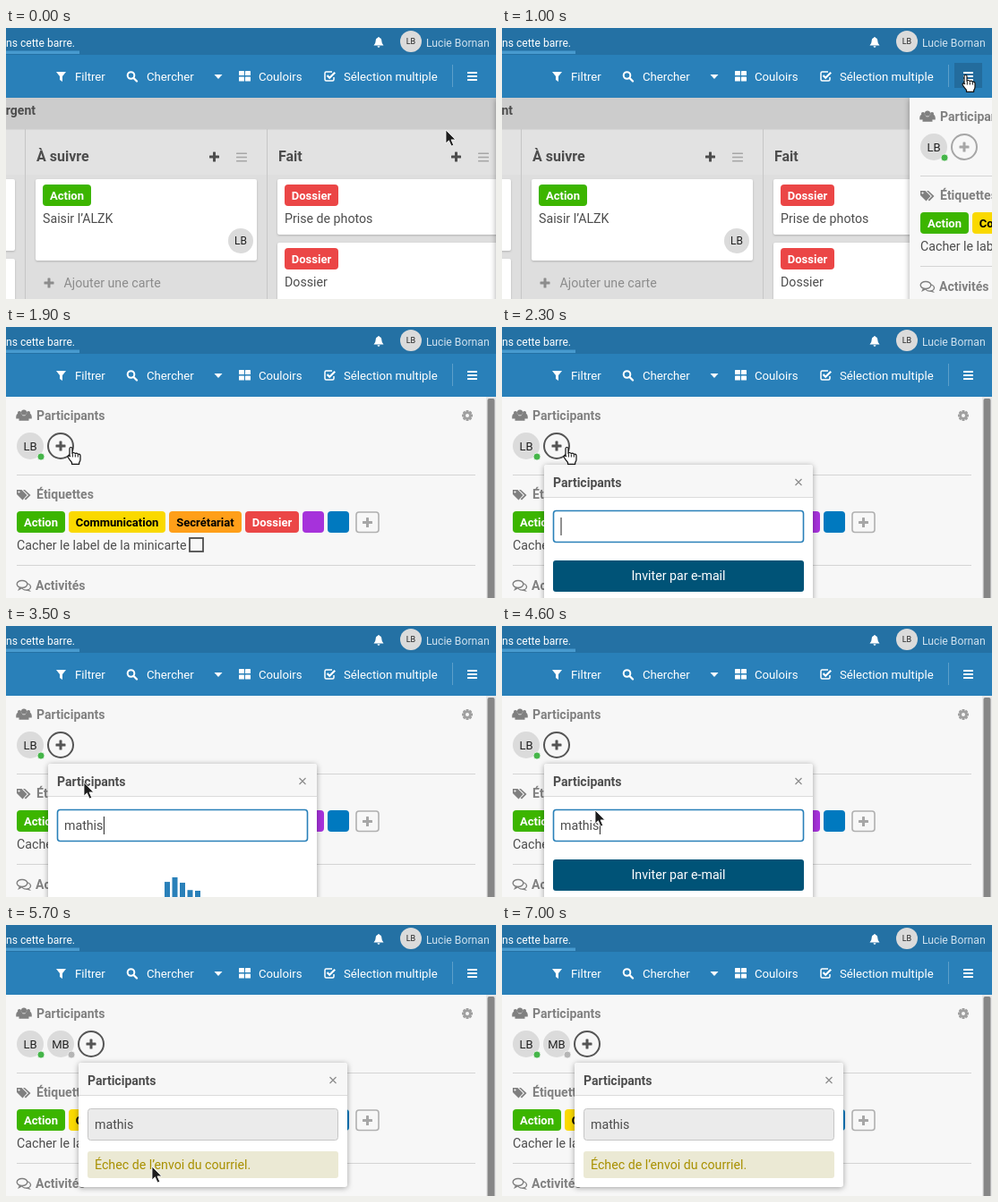
An HTML page that plays this animation: 547 by 303 pixels, repeating every 7.1 s.

```html
<!DOCTYPE html>
<html lang="fr">
<head>
<meta charset="utf-8">
<title>Ajouter un participant</title>
<style>
  html, body { margin: 0; width: 100%; height: 100%; overflow: hidden; }
  svg { display: block; width: 547px; height: 303px; font-family: Roboto, sans-serif; }
  text { white-space: pre; }
  .shadow { filter: drop-shadow(0 1px 3px rgba(0, 0, 0, .35)); }
  .card { filter: drop-shadow(0 1px 1px rgba(0, 0, 0, .2)); }
</style>
</head>
<body>
<svg id="stage" viewBox="0 0 547 303"></svg>
<script>
const LOOP = 7100, STEP = 100;
const GREEN = '#3cb500', RED = '#eb4646', BLUE = '#2980b9', INK = '#4d4d4d', MUTED = '#808080';
const QUERY = 'mathis';

// Drawing helpers
const text = (s, x, y, fill = INK, size = 14.2, extra = '') =>
  `<text x="${x}" y="${y}" fill="${fill}" font-size="${size}" ${extra}>${s}</text>`;
const bold = (s, x, y, fill = INK, size = 14, extra = '') =>
  text(s, x, y, fill, size, `font-weight="700" ${extra}`);
const rect = (x, y, w, h, fill, r = 0, extra = '') =>
  `<rect x="${x}" y="${y}" width="${w}" height="${h}" fill="${fill}" rx="${r}" ${extra}/>`;
const circle = (x, y, r, fill, extra = '') =>
  `<circle cx="${x}" cy="${y}" r="${r}" fill="${fill}" ${extra}/>`;
const path = (d, fill, extra = '') => `<path d="${d}" fill="${fill}" ${extra}/>`;
const group = (id, content, extra = '') => `<g id="${id}" ${extra}>${content}</g>`;
const plus = (x, y, fill = INK) =>
  rect(x - 5.5, y - 1.5, 11, 3, fill, .6) + rect(x - 1.5, y - 5.5, 3, 11, fill, .6);
const bars = (x, y, w, h, gap, fill) =>
  [-1, 0, 1].map(i => rect(x - w / 2, y + i * gap - h / 2, w, h, fill, .5)).join('');
const avatar = (s, x, y, r, size) =>
  circle(x, y, r, '#dbdbdb') + text(s, x, y + size * .36, '#222', size, 'text-anchor="middle"');
const label = (s, x, y, w, fill, ink = '#fff') =>
  rect(x, y, w, 24, fill, 4) + bold(s, x + w / 2, y + 17, ink, 13, 'text-anchor="middle"');
const card = (x, y, w, h) => rect(x, y, w, h, '#fff', 2, 'class="card"');

const header = () =>
  rect(0, 0, 547, 30, '#2471a4') + rect(0, 30, 547, 48, BLUE) +
  text('ns cette barre.', 0, 21, '#fff', 12.1) + rect(0, 25.5, 82, 3.5, '#479acf') +
  path('M410.500 19.500q2.200-2 2.200-5.200 0-3 2.600-3.400v-.9h1.400v.9q2.600.4 2.600 3.400 0 3.200 2.200 5.200zM414.500 20.200h3q-.3 1.500-1.500 1.500t-1.500-1.500z', '#fff') +
  avatar('LB', 452, 15, 12, 9) +
  text('Lucie Bornan', 469, 21, '#cfe2ef', 12.2) +
  group('hover', rect(505, 39, 31, 28, '#236c9d')) +
  path('M56 49h11l-4 5v6l-3-2v-4z', '#fff') + text('Filtrer', 77, 59, '#fff', 13.2) +
  circle(139.500, 53, 3.8, 'none', 'stroke="#fff" stroke-width="2"') +
  path('M142.500 56l3.500 3.500', 'none', 'stroke="#fff" stroke-width="2.300" stroke-linecap="round"') +
  text('Chercher', 157, 59, '#fff', 13.2) + path('M232.500 52h9l-4.500 5z', '#fff') +
  [260, 267].map(x => rect(x, 48, 6, 5, '#fff', .6) + rect(x, 54.500, 6, 5, '#fff', .6)).join('') +
  text('Couloirs', 282, 59, '#fff', 13.2) +
  path('M364 49h-6.500q-1.500 0-1.500 1.500v7q0 1.500 1.500 1.500h7q1.500 0 1.500-1.500v-2.500', 'none', 'stroke="#fff" stroke-width="1.500"') +
  path('M358.500 53l2.700 2.700 6-6', 'none', 'stroke="#fff" stroke-width="2.200"') +
  text('Sélection multiple', 377, 59, '#fff', 13.2) +
  rect(498, 41, 1, 25, '#5c9fca') + bars(520.500, 54, 11, 2, 4, '#fff');

const listHeader = (title, x) =>
  bold(title, x, 149, INK, 16) + plus(x + 198.500, 144) + bars(x + 229, 144.500, 12, 1.600, 4.300, '#a6a6a6');

const board = () =>
  rect(0, 78, 547, 225, '#dedede') + rect(0, 113, 547, 51, '#e2e2e2') +
  rect(0, 78, 547, 35.500, '#ccc') +
  group('lane', bold('Urgent', 33, 97, INK, 14, 'text-anchor="end"')) +
  rect(21, 113, 1, 190, '#c6c6c6') + rect(291, 113, 1, 190, '#c6c6c6') +
  listHeader('À suivre', 34) + listHeader('Fait', 304) +
  card(-20, 169, 30, 80) + card(-20, 258, 30, 60) +
  card(33, 169, 247, 91) + label('Action', 41, 175, 54, GREEN) +
  text('Saisir l’ALZK', 41, 218) + avatar('LB', 262, 238, 14, 12) +
  plus(48, 285, '#8c8c8c') + text('Ajouter une carte', 64.500, 290, '#8c8c8c') +
  card(303, 169, 260, 62) + label('Dossier', 311, 175, 60, RED) + text('Prise de photos', 311, 218) +
  card(303, 240, 260, 80) + label('Dossier', 311, 246, 60, RED) + text('Dossier', 311, 289);

const person = (x, y, s) =>
  circle(x, y, 2.800 * s, MUTED) +
  path(`M${x - 5 * s} ${y + 8.500 * s}q-.4-5.500 ${3 * s}-5.500h${4 * s}q${3.400 * s} 0 ${3 * s} 5.500z`, MUTED);
const gear = (x, y) =>
  [0, 45, 90, 135].map(a => rect(x - 1.500, y - 6, 3, 12, '#a0a0a0', .5, `transform="rotate(${a} ${x} ${y})"`)).join('') +
  circle(x, y, 3.300, '#f7f7f7', 'stroke="#a0a0a0" stroke-width="2.600"');
const bubble = (x, y, rx, ry) =>
  `<ellipse cx="${x}" cy="${y}" rx="${rx}" ry="${ry}" fill="#f7f7f7" stroke="${MUTED}" stroke-width="1.400"/>`;
const presence = (x, fill) => circle(x, 145, 4, fill, 'stroke="#f7f7f7" stroke-width=".8"');

const sidebar = () =>
  rect(0, 78, 560, 230, '#f7f7f7', 0, 'class="shadow"') +
  person(15, 96, .75) + person(25, 96, .75) + person(20, 95.500, 1.100) +
  bold('Participants', 34, 104, MUTED) + gear(515, 99) +
  avatar('LB', 27, 133, 15, 13) + presence(39, '#45b549') +
  group('member', avatar('MB', 61, 133, 15, 13) + presence(73, '#b5b5b5')) +
  group('add', circle(61, 133, 14, 'none', 'stroke="currentColor" stroke-width="2"') + plus(61, 133, 'currentColor')) +
  rect(12, 165, 512, 1, '#d4d4d4') +
  path('M12 182h5.500l6 6-5 5.500-6.500-6.500zM19 182h2l6.500 6-5.500 5.500-1.300-1.200 4.300-4.300z', MUTED) +
  circle(14.500, 184.500, 1.100, '#f7f7f7') +
  bold('Étiquettes', 34, 192, MUTED) +
  label('Action', 12, 206, 54, GREEN) + label('Communication', 70, 206, 108, '#fad900', '#000') +
  label('Secrétariat', 182, 206, 81, '#ff9f19', '#000') + label('Dossier', 267, 206, 60, RED) +
  rect(331, 206, 24, 24, '#a632db', 4) + rect(359, 206, 24, 24, '#0079bf', 4) +
  rect(391, 207, 25, 22.500, 'none', 3, 'stroke="#b0b0b0" stroke-width="1.600"') + plus(403.500, 218.500, '#a6a6a6') +
  text('Cacher le label de la minicarte', 12, 249) +
  rect(205, 236, 15, 15, 'none', 0, `stroke="${INK}" stroke-width="1.800"`) +
  rect(12, 266, 512, 1, '#d4d4d4') +
  path('M24 292l4 4-6-1.500zM15 291l-2 4 5-2.500z', MUTED) + bubble(22.500, 290.500, 5, 3.600) + bubble(18, 287.500, 5.800, 4) +
  bold('Activités', 33, 294, MUTED) +
  rect(536, 78, 11, 225, '#e6e6e6') + rect(537.500, 80, 8, 240, '#868686', 2);

const popup = () =>
  rect(47, 154, 300, 170, '#fff', 3, 'id="frame" class="shadow"') +
  path('M47 190v-33q0-3 3-3h294q3 0 3 3v33z', '#f7f7f7') + rect(47, 190, 300, 1, '#dbdbdb') +
  bold('Participants', 57, 178.500) +
  path('M327.500 170l7 7m0-7l-7 7', 'none', 'stroke="#8c8c8c" stroke-width="1.200"') +
  rect(57.500, 205.500, 279, 35, '#fff', 3, 'id="field"') +
  text('', 65, 228, INK, 14.2, 'id="typed"') + rect(65, 213, 1, 20, '#222', 0, 'id="caret"') +
  group('invite', rect(57, 261, 280, 35, '#005377', 3) +
    text('Inviter par e-mail', 197, 283, '#fff', 14.2, 'text-anchor="middle"')) +
  group('spinner', [0, 1, 2, 3, 4].map(i => rect(177 + i * 8.500, 296, 6, 20, BLUE)).join('')) +
  group('error', rect(57, 253, 280, 30, '#ebe9d4', 3) + text('Échec de l’envoi du courriel.', 65, 273, '#a89000'));

const cursors = () =>
  group('arrow', path('M0 0V15l3.400-3.200 2.700 6.200 2.600-1.100-2.700-6h4.800z', '#1c1c1c', 'stroke="#fff" stroke-width=".8"')) +
  group('hand', path('M-2 9.500V1q0-1.500 1.500-1.500T1 1v5.500q.3-1 1.600-1t1.700 1.200q.4-.7 1.500-.6t1.500 1.300q.5-.5 1.400-.3 1.300.3 1.300 1.800v4q0 2-1.300 3.600v1.800h-8.200v-1.800q-2.500-2.700-4.200-5.700-.6-1.300.3-1.900t2 .6z',
    '#fff', 'stroke="#111" stroke-width="1.200" stroke-linejoin="round"') +
    path('M1.300 7v3.500M4.300 7.500v3M7.300 8v2.500', 'none', 'stroke="#111"'));

document.getElementById('stage').innerHTML =
  board() + group('sidebar', sidebar()) + header() + group('popup', popup()) + cursors();
const el = Object.fromEntries([...document.querySelectorAll('[id]')].map(e => [e.id, e]));

// Held keys: [time, value...]
const pointer = [
  [0, 491, 114, 'arrow'], [400, 496, 104, 'arrow'], [500, 506, 82, 'arrow'], [600, 514, 62, 'hand'],
  [700, 518, 53, 'hand'], [1200, 450, 92, 'arrow'], [1300, 340, 135, 'arrow'], [1400, 252, 161, 'arrow'],
  [1600, 205, 157, 'arrow'], [1700, 138, 148, 'arrow'], [1800, 90, 140, 'arrow'], [1900, 73, 135, 'hand'],
  [2400, 79, 153, 'hand'], [2500, 88, 175, 'hand'], [2700, 87, 175, 'arrow'],
  [4400, 85, 162, 'arrow'], [4500, 90, 176, 'arrow'], [4600, 104, 206, 'arrow'], [4700, 125, 242, 'arrow'],
  [4800, 145, 269, 'hand'], [5000, 145, 269, 'arrow'], [5300, 154, 270, 'arrow'], [5500, 163, 270, 'arrow'],
  [6300, 88, 84, 'arrow'], [6500, 0, 0, 'none']
];
const slide = [[0, 547], [1000, 455], [1100, 240], [1200, 80], [1300, 15], [1400, 0]];
const typing = [[0, 0], [3100, 1], [3200, 2], [3300, 3], [3400, 5], [3500, 6]];
const held = (keys, t) => keys.findLast(k => k[0] <= t).slice(1);

const show = (e, on) => e.setAttribute('display', on ? 'inline' : 'none');
const move = (e, x, y = 0) => e.setAttribute('transform', `translate(${x} ${y})`);
const set = (e, attrs) => { for (const k in attrs) e.setAttribute(k, attrs[k]); };
const ease = u => (1 - Math.cos(Math.PI * u)) / 2;

// Each bar swells over 480 ms, one tenth of a second after its neighbour.
function drawSpinner(elapsed) {
  [...el.spinner.children].forEach((bar, i) => {
    const phase = Math.max(0, 1 - Math.abs(elapsed - i * 100 - 240) / 240);
    const half = 10 + 15 * ease(phase);
    set(bar, { y: 306 - half, height: 2 * half });
  });
}

function render(t) {
  const [x] = held(slide, t);
  move(el.sidebar, x);
  move(el.lane, -21 * (547 - x) / 92);
  show(el.hover, t >= 600 && t < 1200);

  const sending = t >= 5000, done = t >= 5400, searching = t >= 3200 && t < 4000;
  const shift = done ? 34 : 0;
  show(el.member, done);
  move(el.add, shift);
  el.add.style.color = t >= 1900 ? '#555' : '#a6a6a6';

  show(el.popup, t >= 2200);
  move(el.popup, shift);
  el.frame.setAttribute('height', done ? 139 : 170);
  set(el.field, sending
    ? { fill: '#ebebeb', stroke: '#c6c6c6', 'stroke-width': 1 }
    : { fill: '#fff', stroke: BLUE, 'stroke-width': 1.6 });
  el.typed.textContent = QUERY.slice(0, held(typing, t)[0]);
  show(el.caret, !sending);
  if (t >= 2200) el.caret.setAttribute('x', 65.5 + el.typed.getComputedTextLength());
  show(el.invite, !searching && !sending);
  show(el.error, done);
  show(el.spinner, searching || (sending && !done));
  drawSpinner(sending ? t - 5080 : t < 3800 ? Math.min(t, 3500) - 3165 : 1000);

  const [px, py, kind] = held(pointer, t);
  for (const name of ['arrow', 'hand']) {
    show(el[name], name === kind);
    move(el[name], px, py);
  }
}

const start = performance.now();
function tick() {
  const t = (performance.now() - start) % LOOP;
  render(Math.floor(t / STEP) * STEP);
  requestAnimationFrame(tick);
}
tick();
</script>
</body>
</html>
```
